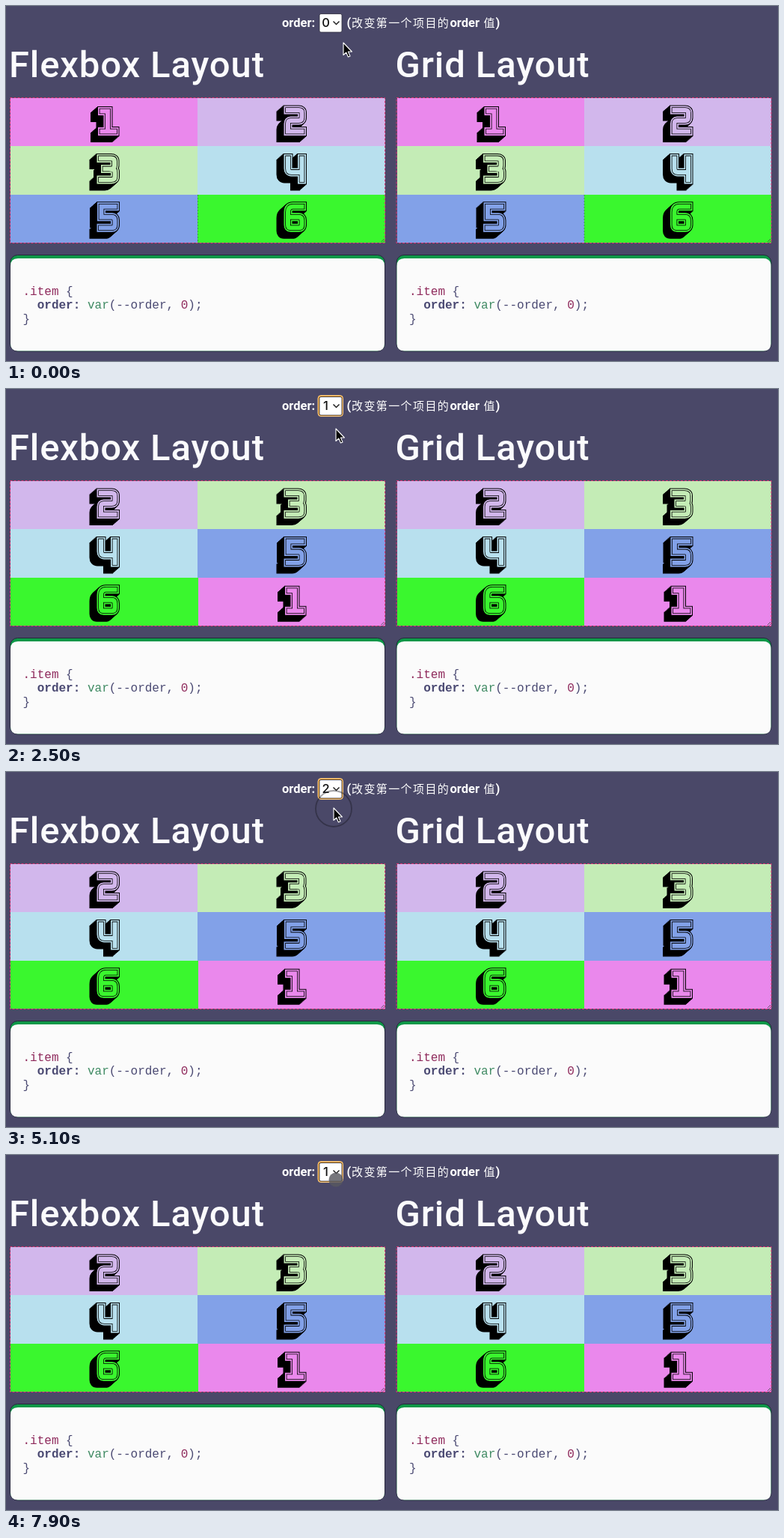
Write an HTML page that moves like this. It is 1032 px wide and 474 px high and loops after 8 s.

```html
<!DOCTYPE html>
<html lang="zh">
<head>
<meta charset="utf-8">
<title>order: Flexbox and Grid</title>
<style>
  html, body { margin: 0; width: 100%; height: 100%; overflow: hidden; background: #4a4868; }
  svg { display: block; width: 1032px; height: 474px; }
  text { white-space: pre; }
  .title { font: 500 49px Roboto, sans-serif; letter-spacing: .85px; fill: #fbfbfd; }
  .label { font: 700 16.5px Roboto, sans-serif; fill: #fff; }
  .cjk { font: 400 15px "Noto Sans CJK SC", "Noto Sans CJK", sans-serif; letter-spacing: 1.4px; fill: #fff; }
  .code { font: 16px "Liberation Mono", monospace; fill: #4b4a73; }
  .code .name { fill: #8f2a5c; }
  .code .fn { fill: #3f8a63; }
  .code .prop { font-weight: 700; }
  .ui { font: 500 16.5px Inter, sans-serif; fill: #111; text-anchor: middle; }
  .cell rect { shape-rendering: crispEdges; }
</style>
</head>
<body>
<svg id="stage" viewBox="0 0 1032 474">
  <rect width="1032" height="474" fill="#4a4868"/>
  <text class="label" x="369" y="28">order:</text>
  <text class="label" x="455.5" y="28">(</text>
  <text class="cjk" x="462" y="28">改变第一个项目的</text>
  <text class="label" x="593.5" y="28">order</text>
  <text class="cjk" x="638.5" y="28">值</text>
  <text class="label" x="654.5" y="28">)</text>
  <g id="panels"></g>
  <g id="select">
    <rect id="focus" x="417" y="8.5" width="33.5" height="28" rx="4" fill="#e39a2c" stroke="#f3c98a" stroke-width="1"/>
    <rect x="419" y="10.5" width="30" height="24.5" rx="2" fill="#fff" stroke="#2c2b3c" stroke-width=".8"/>
    <text id="value" class="ui" x="427.5" y="28"></text>
    <path d="M437.5 20.5l4 4 4-4" fill="none" stroke="#222" stroke-width="1.5"/>
  </g>
  <g id="popup">
    <rect x="409.5" y="6" width="52" height="90" rx="7" fill="#000" opacity=".18"/>
    <rect x="410.5" y="6.5" width="50" height="88" rx="6" fill="#c9c5d1" stroke="#a9a5b5" stroke-width=".8"/>
    <rect id="hover" x="415" width="41" height="26" rx="4" fill="#2873e8"/>
    <g id="items"></g>
    <path id="check" d="M420 24l3.5 4.5 6-10" fill="none" stroke-width="1.8"/>
  </g>
  <circle id="ring" fill="none" stroke="#15151c" stroke-width="1.8"/>
  <circle id="press" r="9.5" fill="#58585f" opacity=".82"/>
  <path id="arrow" d="M0 0V16.5L3.8 13 6.4 19 9 17.9 6.4 12H11.4Z" fill="#050505" stroke="#fff" stroke-width="1.1" stroke-linejoin="round"/>
</svg>
<script>
const $ = id => document.getElementById(id);
const LOOP = 8000, STEP = 100;
const CELL_W = 250, CELL_H = 64.4;

const colors = ['#ea88ec', '#d2b7ec', '#c4ecb6', '#b8e0ee', '#82a1e8', '#3af72e'];
// centre lines of the block digits
const digits = [
  'M8 8H15.5V35M8 35H24.5',
  'M6.5 6.5H21Q25 6.5 25 10V16.5Q25 20.5 21 20.5H10Q6.5 20.5 6.5 24.5V35H25',
  'M6.5 6.5H20Q24.5 6.5 24.5 10V16Q24.5 20.5 20 20.5H12M20 20.5Q25 20.5 25 25V31Q25 35 20.5 35H6.5',
  'M6.5 6.5V20Q6.5 25 11 25H25M25 6.5V35',
  'M25 6.5H7V20.5H21Q25 20.5 25 25V31Q25 35 21 35H6.5',
  'M25 6.5H13Q6.5 6.5 6.5 14V31Q6.5 35 10 35H21Q25 35 25 31V25Q25 20.5 21 20.5H7'
];

// solid shade, outlined body, thin inline
function digit(i) {
  const line = (w, c, x = 0, y = 0) =>
    `<path d="${digits[i]}" transform="translate(${x} ${y})" stroke="${c}" stroke-width="${w}"/>`;
  let shade = '';
  for (let k = 9; k >= 0; k--) shade += line(13, '#000', -k, k * 8 / 9);
  const face = line(11, colors[i]) + line(7.6, '#000') + line(6, colors[i]);
  return `<g transform="translate(114.5 9.5)" fill="none" stroke-linecap="square">${shade}${face}</g>`;
}

function panel(x, title) {
  const cells = colors.map((c, i) =>
    `<g class="cell" data-i="${i}"><rect width="${CELL_W + .5}" height="${CELL_H}" fill="${c}"/>${digit(i)}</g>`).join('');
  return `<g transform="translate(${x} 0)">
    <text class="title" x="4" y="95">${title}</text>
    <g transform="translate(6 123)">${cells}
      <path class="seam" d="M250.5 129V193" stroke="#286d38" stroke-dasharray="2 2" opacity=".6"/></g>
    <rect x="5.5" y="122.5" width="501" height="194" fill="none" stroke="#df3474" stroke-dasharray="3 2"/>
    <path d="M501.5 315l4-4M504 315.5l2-2" stroke="#444" stroke-width=".8"/>
    <rect x="5.5" y="332.5" width="501" height="128.5" rx="10" fill="#0d9848" stroke="#27263c"/>
    <path d="M6 347Q6 337 16 337H496Q506 337 506 347V451Q506 460.5 496 460.5H16Q6 460.5 6 451Z" fill="#fbfbfb"/>
    <g class="code">
      <text x="22.5" y="386"><tspan class="name">.item</tspan> {</text>
      <text x="22.5" y="404">  <tspan class="prop">order:</tspan> <tspan class="fn">var</tspan>(--order, <tspan class="name">0</tspan>);</text>
      <text x="22.5" y="423">}</text>
    </g></g>`;
}

$('panels').innerHTML = panel(0, 'Flexbox Layout') + panel(516.5, 'Grid Layout');
$('items').innerHTML = [0, 1, 2].map(n => `<text class="ui" x="439" y="${29.5 + 26 * n}">${n}</text>`).join('');
const cells = [...document.querySelectorAll('.cell')];
const seams = document.querySelectorAll('.seam');
const labels = [...$('items').children];

// pointer stops: time, x, y
const route = [
  [0, 451, 49], [300, 451, 49], [1000, 433, 24], [1400, 433, 24], [1800, 440, 54],
  [2200, 440, 54], [2500, 441, 53], [3000, 441, 53], [3700, 431, 22], [4400, 431, 22],
  [4800, 438, 48], [5100, 438, 48], [5500, 448, 28], [6100, 448, 28],
  [6500, 440, 5], [6800, 440, 5], [7200, 442, 40], [7500, 441, 33], [8000, 441, 33]
];
const clicks = [1200, 1800, 3800, 4900, 5800, 6600, 7900];
// open from, open to, value while open, value picked
const menus = [[1300, 2100, 0, 1], [3900, 5100, 1, 2], [5900, 6800, 2, 1]];

function pointer(t) {
  const k = route.findIndex(p => p[0] > t);
  const [t0, x0, y0] = route[k - 1], [t1, x1, y1] = route[k];
  const u = (t - t0) / (t1 - t0), e = u * u * (3 - 2 * u);
  return [x0 + (x1 - x0) * e, y0 + (y1 - y0) * e];
}

const show = (el, on) => el.setAttribute('display', on ? 'inline' : 'none');

function drawMenu(menu, y) {
  show($('popup'), menu);
  if (!menu) return;
  const value = menu[2], top = -26 * value;
  const over = Math.max(0, Math.min(2, Math.floor((y - 11 - top) / 26)));
  $('popup').setAttribute('transform', `translate(0 ${top})`);
  $('hover').setAttribute('y', 11.5 + 26 * over);
  labels.forEach((el, n) => el.style.fill = n === over ? '#fff' : '#111');
  $('check').setAttribute('transform', `translate(0 ${26 * value})`);
  $('check').setAttribute('stroke', value === over ? '#fff' : '#111');
}

function drawPointer(t, x, y) {
  const age = t - (clicks.find(c => t >= c && t < c + 300) ?? -1000);
  const pressed = age < 100;
  const ringing = age >= 100 && age < 300;
  show($('press'), pressed);
  show($('ring'), ringing);
  show($('arrow'), !pressed);
  $('press').setAttribute('cx', x);
  $('press').setAttribute('cy', y);
  $('ring').setAttribute('cx', x);
  $('ring').setAttribute('cy', y + 1);
  $('ring').setAttribute('r', 21 + (age - 100) * .03);
  $('ring').setAttribute('opacity', age < 200 ? 1 : .4);
  $('arrow').setAttribute('transform', `translate(${x} ${y})`);
}

function render(ms) {
  const t = Math.floor(ms % LOOP / STEP) * STEP;
  const [x, y] = pointer(t);
  const picked = menus.filter(m => t >= m[1]).pop();
  const value = picked ? picked[3] : 0;
  cells.forEach(el => {
    const i = +el.dataset.i, slot = value ? (i + 5) % 6 : i;
    el.setAttribute('transform', `translate(${slot % 2 * CELL_W} ${Math.floor(slot / 2) * CELL_H})`);
  });
  seams.forEach(el => show(el, !value));
  $('value').textContent = value;
  show($('focus'), value);
  drawMenu(menus.find(m => t >= m[0] && t < m[1]), y);
  drawPointer(t, x, y);
}

const start = performance.now();
function tick() {
  render(performance.now() - start);
  requestAnimationFrame(tick);
}
render(0);
requestAnimationFrame(tick);
</script>
</body>
</html>
```
